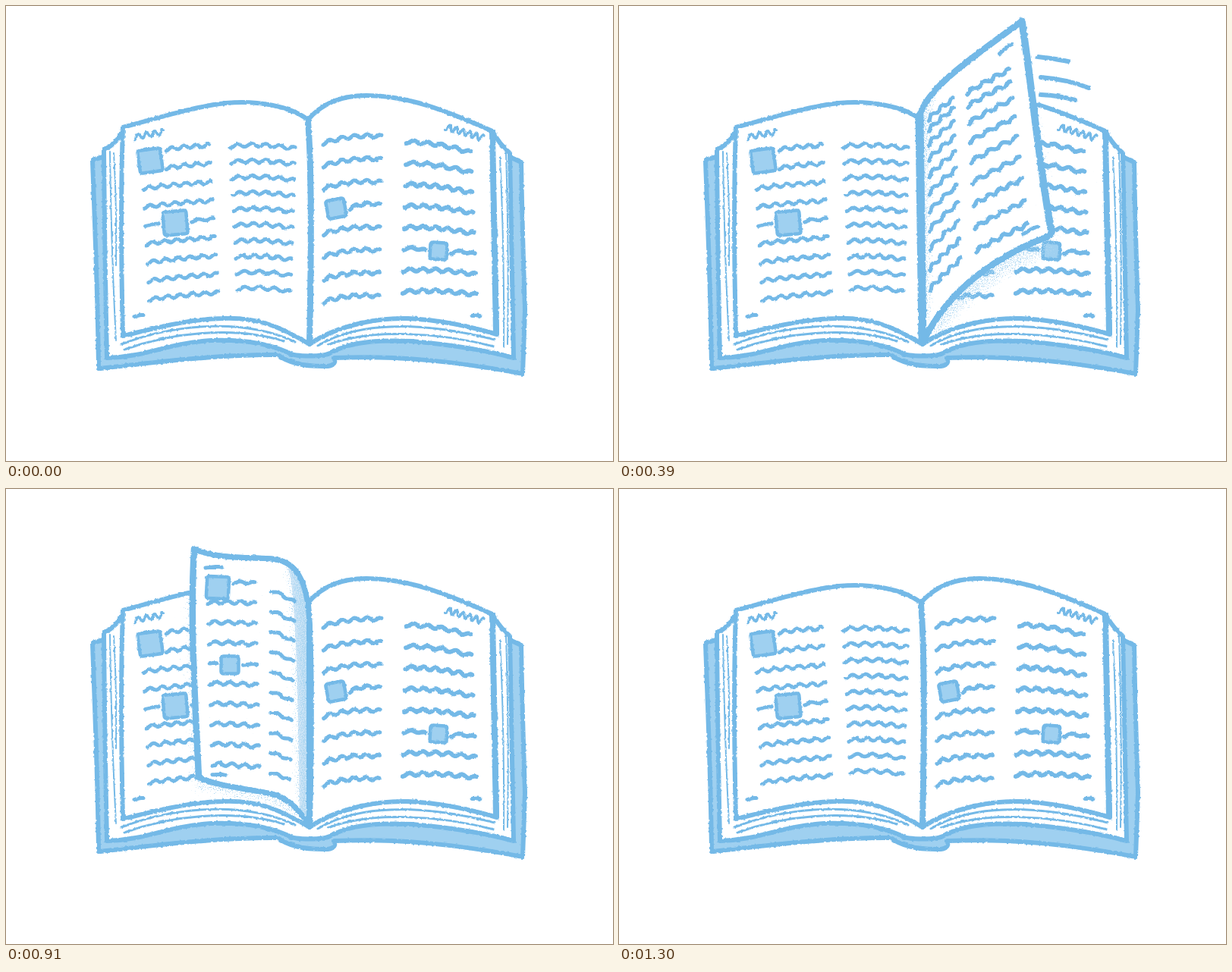
An HTML page for the animation above (2.83 s loop, 800x600 px).

```html
<!DOCTYPE html>
<html lang="en">
<head>
<meta charset="utf-8">
<title>Book</title>
<style>
  html, body { margin: 0; width: 100%; height: 100%; overflow: hidden; background: #fff; }
  svg { display: block; width: 100%; height: 100%; }
</style>
</head>
<body>
<svg id="stage" viewBox="0 0 800 600">
  <defs>
    <filter id="rough" filterUnits="userSpaceOnUse" x="0" y="0" width="800" height="600" color-interpolation-filters="sRGB">
      <feTurbulence type="fractalNoise" baseFrequency=".28" numOctaves="1" seed="4"/>
      <feDisplacementMap in="SourceGraphic" scale="3.2" xChannelSelector="R" yChannelSelector="G"/>
    </filter>
    <filter id="grain" filterUnits="userSpaceOnUse" x="0" y="0" width="800" height="600" color-interpolation-filters="sRGB">
      <feTurbulence type="fractalNoise" baseFrequency=".75" numOctaves="2" seed="9" result="noise"/>
      <feGaussianBlur in="SourceAlpha" stdDeviation="9" result="soft"/>
      <feComposite in="noise" in2="soft" operator="arithmetic" k2="6" k3="3.2" k4="-5.2" result="dots"/>
      <feFlood flood-color="#b0d8f2"/>
      <feComposite in2="dots" operator="in"/>
    </filter>
  </defs>
</svg>
<script>
const LINE = '#74b9e7', FILL = '#9fd0f0', TINT = '#d0e6f7';
const STEP = 130, LOOP = 2830, SPINE = 400;
const stage = document.getElementById('stage');
const still = (x, y) => [x, y];
const mix = (a, b, t) => a + (b - a) * t;

function add(parent, tag, attrs) {
  const el = document.createElementNS('http://www.w3.org/2000/svg', tag);
  for (const k in attrs) el.setAttribute(k, attrs[k]);
  return parent.appendChild(el);
}

function path(parent, d, width = 6, fill = 'none', stroke = LINE) {
  return add(parent, 'path', {
    d, fill, stroke, 'stroke-width': width, 'stroke-linecap': 'round', 'stroke-linejoin': 'round'
  });
}

// Wavy stroke between two points, arched by bow
function squiggle(parent, [x1, y1, x2, y2], { w = 5, bow = 1, amp = 2.1, wave = 16 } = {}, warp = still) {
  [x1, y1] = warp(x1, y1);
  [x2, y2] = warp(x2, y2);
  const dx = x2 - x1, dy = y2 - y1, len = Math.hypot(dx, dy);
  const waves = Math.max(1, Math.round(len / wave)) - .4, count = Math.ceil(waves * 8);
  const short = Math.min(1, len / 45);
  let d = '';
  for (let i = 0; i <= count; i++) {
    const t = i / count, p = t * waves * Math.PI * 2;
    const off = short * (amp * Math.cos(p) - bow * 4 * t * (1 - t));
    d += `${i ? 'L' : 'M'}${(x1 + dx * t - dy / len * off).toFixed(1)} ${(y1 + dy * t + dx / len * off).toFixed(1)}`;
  }
  path(parent, d, w);
}

// Rows blended from the first to the last, broken around boxes
function column(parent, { rows, first, last, grow = 1, ...style }, boxes = [], warp = still) {
  for (let i = 0; i < rows; i++) {
    const t = (i / (rows - 1)) ** grow;
    const [x1, y1, x2, y2] = first.map((v, k) => mix(v, last[k], t));
    const at = x => mix(y1, y2, (x - x1) / (x2 - x1));
    const hit = boxes.find(([cx, cy, size]) =>
      cx > x1 - 5 && cx < x2 && Math.abs(at(cx) - cy) < size / 2 + 5);
    const parts = hit
      ? [[x1, hit[0] - hit[2] / 2 - 6], [hit[0] + hit[2] / 2 + 6, x2]]
      : [[x1, x2]];
    for (const [a, b] of parts) if (b - a > 8) squiggle(parent, [a, at(a), b, at(b)], style, warp);
  }
}

function box(parent, [x, y, size, turn], warp = still) {
  const [cx, cy] = warp(x, y);
  add(parent, 'rect', {
    x: cx - size / 2, y: cy - size / 2, width: size, height: size, rx: 3, fill: FILL, stroke: LINE,
    'stroke-width': 4.5, transform: `rotate(${turn} ${cx} ${cy})`
  });
}

function print(parent, { columns, boxes = [], marks = [] }, warp) {
  columns.forEach(c => column(parent, c, boxes, warp));
  marks.forEach(m => squiggle(parent, m, {}, warp));
  boxes.forEach(b => box(parent, b, warp));
}

const leftPage = 'M154 160C200 148 250 132 290 128C330 124 375 132 398 150C402 200 402 300 400 446C360 422 330 410 285 412C240 413 200 424 154 435C152 350 151 250 154 160Z';
const rightPage = 'M398 150C415 130 440 118 475 118C530 118 580 138 641 165L647 433C610 422 570 414 530 412C480 411 430 425 400 446C402 300 402 200 398 150Z';
const spread = {
  columns: [
    { rows: 9, first: [178, 192, 268, 184], last: [189, 387, 280, 378], w: 4.8 },
    { rows: 10, first: [296, 185, 381, 188], last: [305, 373, 375, 377], w: 4.8, bow: 3 },
    { rows: 8, first: [418, 181, 495, 172], last: [419, 390, 492, 383], w: 5.2, bow: 4 },
    { rows: 8, first: [528, 179, 612, 193], last: [523, 377, 620, 381], w: 5.8, bow: 3 }
  ],
  boxes: [[190, 204, 30, -8], [223, 286, 31, -5], [435, 267, 24, -11], [570, 323, 22, 3]],
  marks: [[169, 409, 181, 408], [614, 408, 625, 409]]
};

function drawBook() {
  const g = add(stage, 'g', { filter: 'url(#rough)' });
  path(g, 'M114 203L128 199L664 199L679 206C680 270 682 340 684 400L681 485C600 470 520 460 433 464Q436 476 418 475Q378 475 358 460C280 459 200 470 122 478C121 380 117 290 114 203Z', 6, FILL);
  path(g, 'M129 190Q148 180 154 163L398 150L641 165Q650 182 664 194L669 464C640 456 590 447 535 442C500 441 460 440 428 457C420 463 380 463 372 457C350 447 320 439 270 441C210 445 190 462 133 464Q130 320 129 190Z', 6, '#fff');
  path(g, 'M137 192Q139 330 145 441M142 194Q146 260 145 342M651 199Q657 320 656 450M659 194Q663 320 661 446', 2);
  path(g, 'M152 446C230 416 320 414 381 443M156 453C230 427 310 424 366 442M411 448C470 412 560 419 644 440M424 447C480 425 570 430 643 449', 3);
  path(g, leftPage, 6, '#fff');
  path(g, rightPage, 6, '#fff');
  path(g, 'M398 152C402 200 403 300 400 444M641 168L646 431', 8);
  const zigzag = { w: 3.5, bow: 0, amp: 4, wave: 9 };
  squiggle(g, [169, 173, 208, 166], zigzag);
  squiggle(g, [580, 160, 629, 174], zigzag);
  print(g, spread);
}

// Outline runs up the spine, along the top, down the free edge and back
const lifted = {
  spine: '394 155', top: 'C398 95 440 72 480 63C520 54 560 52 595 43', edge: 'C600 150 614 250 614 345',
  bottom: 'C560 330 520 334 480 345C430 365 405 410 400 444', width: 8.5, cast: [9, 26],
  columns: [
    { rows: 7, first: [412, 142, 467, 107], last: [436, 331, 501, 305], w: 6, bow: 4 },
    { rows: 7, first: [502, 101, 569, 92], last: [528, 299, 591, 296], w: 6, bow: 4 }
  ],
  boxes: [[430, 232, 19, -25], [560, 266, 22, 0]],
  marks: [[548, 72, 574, 69], [570, 316, 594, 319]]
};
const steep = {
  spine: '396 145', top: 'C408 105 470 65 531 20', edge: 'C546 120 555 220 570 298',
  bottom: 'Q570 303 560 306C520 322 440 360 400 444', width: 8, cast: [10, 24],
  columns: [
    { rows: 11, first: [407, 150, 441, 122], last: [409, 374, 451, 333], grow: 1.2, w: 5 },
    { rows: 9, first: [458, 115, 515, 84], last: [470, 323, 539, 288], grow: 1.2, w: 5.5 }
  ],
  marks: [[501, 62, 518, 51], [532, 300, 552, 292]],
  whoosh: 'M552 67Q572 69 592 73M556 94Q592 97 619 108M556 117Q580 118 601 124'
};
const upright = {
  spine: '396 150', top: 'C396 110 392 60 387 29', edge: 'C370 90 362 150 352 230C347 290 350 350 356 397',
  bottom: 'Q385 415 400 444', width: 7, cast: [-26, 6], fold: 14,
  columns: [{ rows: 11, first: [371, 140, 381, 154], last: [364, 387, 380, 395], w: 4.5, bow: 0, wave: 9 }],
  marks: [[381, 103, 385, 130]]
};
const falling = {
  spine: '400 180', top: 'C398 105 372 94 350 92C320 90 275 92 248 79', edge: 'C242 180 250 290 254 380',
  bottom: 'C280 393 320 395 350 402C375 408 390 428 400 444', width: 7, cast: [-9, 14], fold: 26,
  columns: [
    { rows: 10, first: [265, 123, 328, 124], last: [272, 363, 334, 367] },
    { rows: 10, first: [350, 134, 380, 149], last: [349, 374, 374, 384] }
  ],
  boxes: [[279, 130, 29, 3], [295, 232, 23, 0]],
  marks: [[263, 103, 285, 104], [272, 376, 289, 378]]
};
const landing = {
  spine: '399 150', top: 'C380 115 345 95 300 94C250 93 230 107 191 108', edge: 'C189 200 188 300 194 403',
  bottom: 'C240 400 290 395 330 402C365 410 385 425 400 444', width: 7, cast: [-12, 9],
  columns: [
    { rows: 9, first: [209, 140, 282, 138], last: [213, 358, 273, 357] },
    { rows: 10, first: [314, 141, 369, 160], last: [302, 374, 370, 385] }
  ],
  boxes: [[219, 152, 30, -5], [248, 240, 24, -4]],
  marks: [[205, 121, 233, 117], [206, 385, 224, 384]]
};

// Swing a page about the spine: squeeze its width, tilt and stretch its height
const swing = (sheet, k, tilt, stretch = 0) => ({
  ...sheet, k, whoosh: '',
  warp: (x, y) => [SPINE + (x - SPINE) * k, y + Math.abs(x - SPINE) * (tilt + stretch * (y - 300))]
});

const turn = [
  swing(lifted, 1.17, .25), lifted, steep, swing(steep, .48, -.08), upright,
  swing(falling, .58, 0, .00074), falling, landing, swing(landing, 1.1, .104, -.00018)
];

function drawSheet(sheet, i) {
  const { spine, top, edge, bottom, width, cast, fold = 0, whoosh, k = 1, warp = still } = sheet;
  const bend = d => d.replace(/([\d.]+) ([\d.]+)/g, (_, x, y) => warp(+x, +y).map(v => v.toFixed(1)).join(' '));
  const left = cast[0] < 0;
  const page = bend(`M400 444L${spine}${top}${edge}${bottom}Z`);
  const corner = top.match(/[\d.]+ [\d.]+$/)[0];
  const group = add(stage, 'g', { display: 'none' });
  const clipped = (id, d) => {
    path(add(group, 'clipPath', { id }), d);
    return add(group, 'g', { 'clip-path': `url(#${id})` });
  };
  const grain = parent => add(parent, 'g', { filter: 'url(#grain)' });

  const shadow = grain(clipped('under' + i, left ? leftPage : rightPage));
  const reach = cast.map(v => v * Math.min(1, k ** -4));
  add(shadow, 'path', { d: page, transform: `translate(${reach})`, 'fill-opacity': .75 });

  path(add(group, 'g', { filter: 'url(#rough)' }), page, width, '#fff');
  const shade = clipped('inner' + i, page);
  const crease = left ? 'M384 100Q397 130 400 440' : 'M404 115Q394 160 399 410';
  if (fold) path(shade, crease, fold, 'none', TINT);
  path(grain(shade), crease, 24 + fold / 3, 'none', '#000');

  const ink = add(group, 'g', { filter: 'url(#rough)' });
  path(ink, page, width);
  path(ink, bend(`M400 442L${spine}`), left ? 8 : 11);
  path(ink, bend(`M${corner}${edge}`), width + 1.5);
  print(ink, sheet, warp);
  if (whoosh) path(ink, whoosh, 6);
  return group;
}

drawBook();
const pages = turn.map(drawSheet);
let shown = -1;

function render(time) {
  const now = Math.floor(time % LOOP / STEP) - 1;
  if (now === shown) return;
  shown = now;
  pages.forEach((g, i) => g.setAttribute('display', i === now ? 'inline' : 'none'));
}

const start = performance.now();
function tick() {
  render(performance.now() - start);
  requestAnimationFrame(tick);
}
tick();
</script>
</body>
</html>
```
